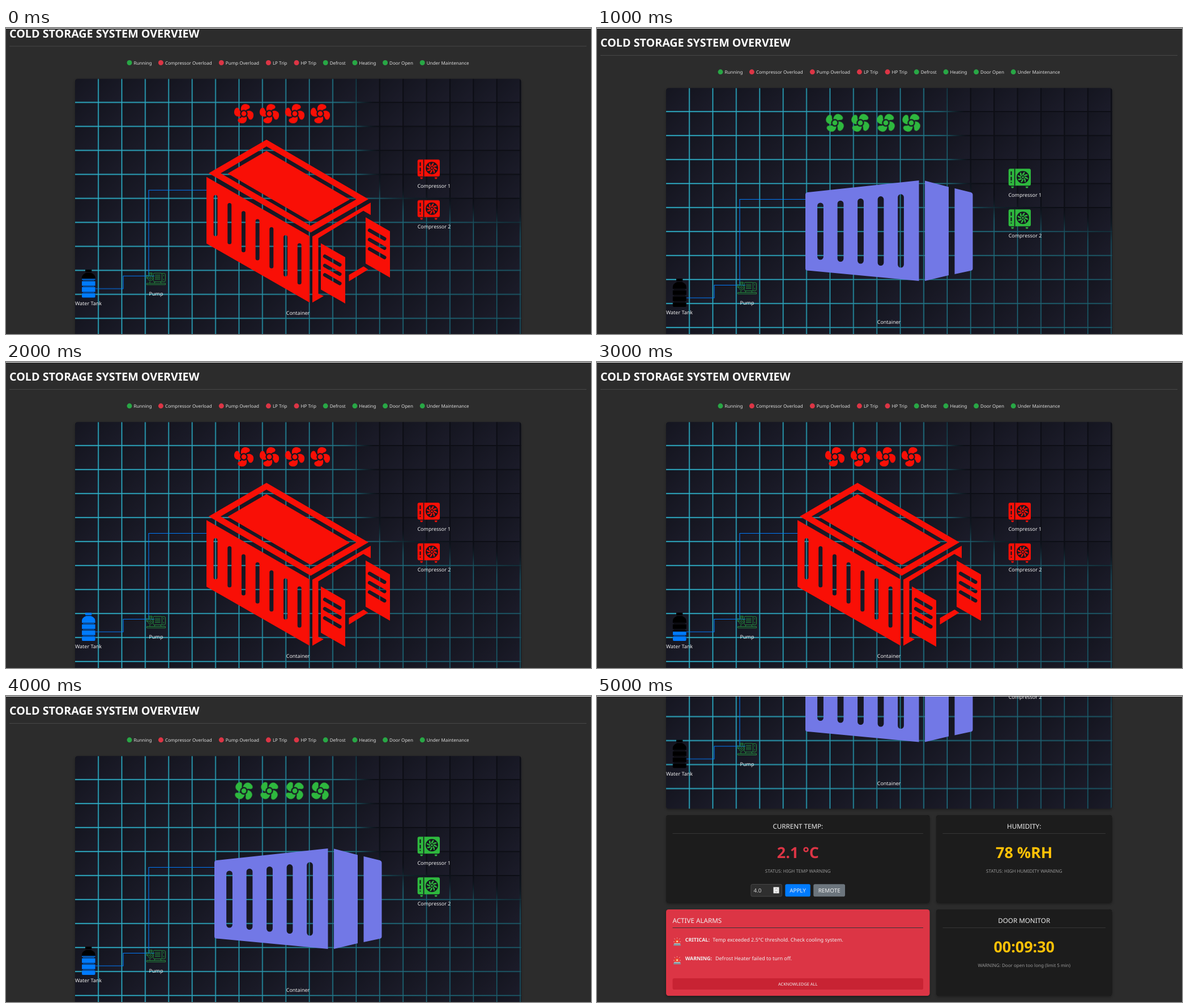
An HTML page for the animation above (6000 ms loop, 1033 px wide and 542 px high).

```html
<!DOCTYPE html>
<html lang="en">
<head>
<meta charset="utf-8">
<title>Cold Storage System Overview</title>
<style>
html, body { margin: 0; width: 100%; height: 100%; overflow: hidden; background: #2c2c2c; }
svg { display: block; width: 1033px; height: 542px; }
text { font: 8.96px "Noto Sans", "Open Sans", sans-serif; fill: #f0f0f0; text-rendering: geometricPrecision; }
.mid text, text.mid { text-anchor: middle; }
text.title { font-size: 19.71px; font-weight: 700; fill: #fff; }
.legend text { font-size: 8.06px; fill: #ddd; }
text.head { font-size: 11.65px; }
text.value { font-size: 26.9px; font-weight: 700; }
text.note { font-size: 8.06px; fill: #999; }
text.btn { font-size: 9.86px; }
text.ack { font-size: 7.4px; }
.bold { font-weight: 700; }
.green { fill: #28a745; }
.red { fill: #dc3545; }
.amber { fill: #ffc107; }
.card { fill: #1a1a1a; }

.page, .state, .spin, .open, .shut, .water { animation: 6s step-end infinite; }
.page { animation-name: scroll; }
.state { animation-name: state; }
.spin { animation-name: spin; }
.open { animation-name: open; }
.shut { animation-name: shut; }
.water { animation-name: level; }
@keyframes scroll {
  0% { transform: translateY(-16.3px); }
  16.666% { transform: translateY(0); }
  83.333% { transform: translateY(-366.5px); }
}
@keyframes state {
  0%, 33.333% { color: #f90f06; }
  16.666%, 66.666% { color: #2eb83e; }
}
@keyframes spin {
  0%, 33.333% { transform: rotate(0deg); }
  16.666% { transform: rotate(20deg); }
  66.666% { transform: rotate(30deg); }
}
@keyframes open {
  0%, 33.333% { visibility: visible; }
  16.666%, 66.666% { visibility: hidden; }
}
@keyframes shut {
  0%, 33.333% { visibility: hidden; }
  16.666%, 66.666% { visibility: visible; }
}
@keyframes level {
  0%, 66.666% { clip-path: inset(33% 0 0 0); }
  16.666%, 83.333% { clip-path: inset(100% 0 0 0); }
  33.333% { clip-path: inset(0 0 0 0); }
  50% { clip-path: inset(67% 0 0 0); }
}
</style>
</head>
<body>
<svg viewBox="0 0 1033 542">
  <defs>
    <linearGradient id="shade" x2="1" y2="1">
      <stop stop-color="#14151f"/><stop offset="1" stop-color="#1c1c2a"/>
    </linearGradient>
    <pattern id="tiles" x="121.7" y="105.5" width="41.39" height="42.5" patternUnits="userSpaceOnUse">
      <rect width="42" height="43" fill="url(#shade)"/>
    </pattern>
    <linearGradient id="fade">
      <stop stop-color="#fff"/><stop offset=".35" stop-color="#ddd"/>
      <stop offset=".6" stop-color="#999"/><stop offset="1" stop-color="#707070"/>
    </linearGradient>
    <filter id="soft"><feGaussianBlur stdDeviation="14"/></filter>
    <filter id="drop" x="-5%" y="-10%" width="110%" height="125%">
      <feDropShadow dx="0" dy="2" stdDeviation="2" flood-opacity=".35"/>
    </filter>
    <mask id="lit" maskUnits="userSpaceOnUse" x="122" y="106" width="788" height="460">
      <rect x="122" y="106" width="788" height="460" fill="url(#fade)"/>
      <path d="M612 60L640 295L700 325L920 366L970 60Z" filter="url(#soft)"/>
    </mask>
    <clipPath id="panel"><rect x="122" y="106.5" width="787.5" height="459.5" rx="4.5"/></clipPath>

    <g id="fan" fill="currentColor">
      <circle r="4.4"/>
      <path id="blade" d="M-4.6 -5C-6 -9-5 -16 1 -17C6 -17.6 11 -15.2 10.6 -11.4C10.2 -8 5.5 -8 3.4 -5.7C.5 -7.2-2 -7-4.6 -5Z"/>
      <use href="#blade" transform="rotate(90)"/>
      <use href="#blade" transform="rotate(180)"/>
      <use href="#blade" transform="rotate(270)"/>
    </g>

    <g id="unit">
      <path fill="currentColor" d="M3 0H36.5Q39.3 0 39.3 3V27Q39.3 30 36.5 30H3Q0 30 0 27V3Q0 0 3 0ZM4.5 31.5H9.5L8.5 34.3H5.5ZM30 31.5H35L34 34.3H31Z"/>
      <path stroke="#15151f" stroke-width="1.6" d="M10.9 0V30"/>
      <path stroke="#15151f" stroke-width="2.2" stroke-linecap="round" d="M4.8 5.5V10.5M4.8 15V20M4.8 24.2V24.3"/>
      <circle cx="25.3" cy="15" r="11" fill="#15151f"/>
      <g id="rotor" transform="translate(25.3 15)" fill="none" stroke="currentColor" stroke-width="2.5">
        <circle r="1.8" fill="currentColor" stroke="none"/>
      </g>
    </g>

    <path id="bottle" d="M140 444H151.300V448.500H140ZM141.500 449.800H150Q157.800 453 157.800 459V462H133.800V459Q133.800 453 141.500 449.800ZM135.500 462.900H156V463.900H135.500ZM133.800 464.700H157.800V472.800H133.800ZM135.500 473.600H156V474.600H135.500ZM133.800 475.400H157.800V483.700H133.800ZM135.500 484.500H156V485.500H135.500ZM133.800 486.300H157.800V492Q157.800 494 155.500 494H136Q133.800 494 133.800 492Z"/>

    <g id="siren">
      <path d="M-4.8 .5L-6.500 0M-3.600 -4L-5 -5.500M0 -5.500V-7M3.600 -4L5 -5.500M4.800 .5L6.500 0" stroke="#f6b9a0" stroke-width="1"/>
      <path d="M-4 3V0A4 4 0 0 1 4 0V3Z" fill="#f0452f"/>
      <circle cy="-.2" r="1.5" fill="#ffe0b0"/>
      <path d="M-5.500 3H5.500L6.500 7.200H-6.500Z" fill="#8596a0"/>
      <path d="M-5.500 3H5.500V4.300H-5.500Z" fill="#b5c2c9"/>
    </g>
  </defs>

  <rect width="1033" height="542" fill="#2c2c2c"/>
  <g class="page">
    <text class="title" x="6" y="33.400">COLD STORAGE SYSTEM OVERVIEW</text>
    <path d="M6 48.500H1025" stroke="#484848"/>
    <g class="legend" id="legend"></g>

    <rect x="122" y="106.500" width="787.500" height="459.500" rx="4.500" fill="#15151f" filter="url(#drop)"/>
    <g clip-path="url(#panel)" fill="none">
      <rect x="121" y="105" width="790" height="462" fill="url(#tiles)"/>
      <path class="grid" stroke="#0d0e15" stroke-width="2.200"/>
      <g mask="url(#lit)">
        <path class="grid" stroke="#1c7f98" stroke-opacity=".35" stroke-width="3.200"/>
        <path class="grid" stroke="#36bdd6" stroke-width="1.300"/>
      </g>
    </g>

    <path d="M369.500 303.500H252V455.500M262 455.500H207V478H157" fill="none" stroke="#007bff" stroke-width="1.100"/>

    <g class="state">
      <g transform="translate(420 168)"><use href="#fan" class="spin"/></g>
      <g transform="translate(465 168)"><use href="#fan" class="spin"/></g>
      <g transform="translate(510 168)"><use href="#fan" class="spin"/></g>
      <g transform="translate(555 168)"><use href="#fan" class="spin"/></g>
      <use href="#unit" x="726.700" y="249.300"/>
      <use href="#unit" x="726.700" y="321.300"/>
    </g>

    <g class="open" fill="#f90f06" fill-rule="evenodd">
      <path d="M460 214L640 319.500L538 378.500L358 273.500ZM460 226L379 273.500L538 366.500L619 319.500ZM460 234L391.500 274L538 359.500L607 320Z"/>
      <path id="wall"/>
      <path d="M541 385.500L644 325.500V347.500L631 340L551.500 388.500V487L561 491L541 502.500Z"/>
      <path class="door" data-x="556" data-y="397.500"/>
      <path class="door" data-x="635" data-y="351.500"/>
      <path d="M605.500 453.500L631.500 438.500L639.500 444L605.500 465Z"/>
    </g>

    <g class="shut" fill="#7278e6">
      <path id="side" fill-rule="evenodd"/>
      <path d="M579 270.500L621 281.500V438L579 448ZM631.500 284L660 291Q663.500 292 663.500 295.500V426Q663.500 429 660.500 429.800L631.500 436Z"/>
    </g>

    <use href="#bottle"/>
    <use href="#bottle" class="water" fill="#007bff"/>

    <g fill="none" stroke="#28a745" stroke-width=".8">
      <path d="M248.500 471H281.500V468.500H248.500ZM254 468.500V465M262 468.500L263 465.500M274 468.500L273 465.500"/>
      <rect x="260" y="450.500" width="15.500" height="15" rx="2"/>
      <path d="M263 454H272.500M263 456.500H272.500M263 459H272.500M263 461.500H272.500"/>
      <path d="M275.500 451H279.500Q281.500 451 281.500 453V463Q281.500 465.500 279.500 465.500H275.500M278.500 453.500V456M278.500 460.500V463"/>
      <path d="M248.500 453.500V460M248.500 455H251.500M248.500 459H251.500M252 450H258V452H252ZM253 452V455M257 452V455"/>
      <circle cx="255" cy="459.500" r="4.500"/>
      <circle cx="255" cy="459.500" r="1.800"/>
    </g>

    <g class="mid">
      <text x="755.800" y="299.200">Compressor 1</text>
      <text x="756" y="371.200">Compressor 2</text>
      <text x="265" y="490">Pump</text>
      <text x="145.500" y="507.200">Water Tank</text>
      <text x="515.500" y="524">Container</text>
    </g>

    <g transform="translate(0 366.500)">
      <g filter="url(#drop)">
        <rect class="card" x="122" y="211" width="465.500" height="155.500" rx="4.500"/>
        <rect class="card" x="599" y="211" width="310.500" height="155.500" rx="4.500"/>
        <rect class="red" x="122" y="378" width="465.500" height="153" rx="4.500"/>
        <rect class="card" x="599" y="378" width="310.500" height="153" rx="4.500"/>
      </g>
      <path d="M133.500 243.500H576M610.500 243.500H898M133.500 410.500H576M610.500 410.500H898" stroke="#363636"/>

      <g class="mid">
        <text class="head" x="354.800" y="235.200">CURRENT TEMP:</text>
        <text class="value red" x="354.800" y="287" style="fill:#dc3545">2.1 °C</text>
        <text class="note" x="354.800" y="313.300">STATUS: HIGH TEMP WARNING</text>
        <text class="head" x="754.200" y="235.200">HUMIDITY:</text>
        <text class="value" x="754.200" y="287" style="fill:#ffc107">78 %RH</text>
        <text class="note" x="754.200" y="313.300">STATUS: HIGH HUMIDITY WARNING</text>
        <text class="head" x="754.200" y="402.200">DOOR MONITOR</text>
        <text class="value" x="754.200" y="454" style="fill:#ffc107">00:09:30</text>
        <text class="note" x="754.200" y="480.200">WARNING: Door open too long (limit 5 min)</text>
      </g>

      <rect x="271.900" y="333.500" width="54.600" height="21.500" rx="2.500" fill="#2f2f2f" stroke="#505050" stroke-width=".8"/>
      <text class="btn" x="276.500" y="347.700" style="fill:#ccc">4.0</text>
      <rect x="311.500" y="338.500" width="10" height="11" fill="#efefef"/>
      <path d="M314.500 342.700L316.500 340.700L318.500 342.700M314.500 345.500L316.500 347.500L318.500 345.500" fill="none" stroke="#777" stroke-width=".8"/>
      <rect x="332.300" y="333.200" width="44.500" height="22" rx="2.800" fill="#007bff"/>
      <text class="btn mid" x="354.500" y="347.700">APPLY</text>
      <rect x="382.200" y="333.200" width="55.800" height="22" rx="2.800" fill="#6c757d"/>
      <text class="btn mid" x="410.200" y="347.700">REMOTE</text>

      <text class="head" x="133.500" y="402.200">ACTIVE ALARMS</text>
      <use href="#siren" x="141.500" y="435"/>
      <text class="bold" x="155.700" y="435.200">CRITICAL:</text>
      <text x="204.300" y="435.200">Temp exceeded 2.5°C threshold. Check cooling system.</text>
      <use href="#siren" x="141.500" y="468"/>
      <text class="bold" x="155.700" y="468.200">WARNING:</text>
      <text x="209" y="468.200">Defrost Heater failed to turn off.</text>
      <rect x="133.500" y="500" width="442.500" height="20" rx="2.800" fill="#c82333"/>
      <text class="ack mid" x="354.700" y="512.700">ACKNOWLEDGE ALL</text>
    </g>
  </g>
  <rect width="1033" height="1" fill="#f4f4f4"/>
</svg>
<script>
const $ = s => document.querySelector(s);
const all = s => document.querySelectorAll(s);
const range = n => [...Array(n).keys()];
const SLOPE = 0.577;

// vertical slot with round ends
const slot = (x, top, bottom, r) =>
  `M${x - r} ${top + r}a${r} ${r} 0 0 1 ${2 * r} 0V${bottom - r}a${r} ${r} 0 0 1 ${-2 * r} 0Z`;

const columns = range(19).map(i => `M${163.1 + i * 41.39} 105V567`);
const rows = range(11).map(i => `M121 ${148 + i * 42.5}H911`);
all('.grid').forEach(p => p.setAttribute('d', columns.concat(rows).join('')));

const wallSlots = range(7).map(i => {
  const x = 370 + i * 24.7, top = 312 + (x - 370) * SLOPE;
  return slot(x, top, top + 73, 3.5);
});
$('#wall').setAttribute('d', 'M354 280L536 385V502.5L354 398Z' + wallSlots.join(''));

const sideSlots = range(5).map(i => slot(394.5 + i * 35.5, 309.5 - i * 3.8, 410.5 + i * 3.5, 5.4));
$('#side').setAttribute('d',
  'M372 291L568.500 270V448L371 429.500Q368 429 368 426V295Q368 291.500 372 291Z' + sideSlots.join(''));

// sheared panel with three slanted slots
all('.door').forEach(p => {
  const x = +p.dataset.x, y = +p.dataset.y;
  const slots = range(3).map(i =>
    `M${x + 8} ${y + 20 + i * 16.5}l27 15.600a3.200 3.200 0 0 1 -2.600 5.800l-27 -15.600a3.200 3.200 0 0 1 2.600 -5.800Z`);
  p.setAttribute('d', `M${x} ${y}l43 24.800v82l-43 -24.800Z` + slots.join(''));
});

$('#rotor').innerHTML += range(8).map(i =>
  `<path d="M0 -3.200Q.3 -6.500 3 -8.600" transform="rotate(${i * 45})"/>`).join('');

const lamps = [
  [218, 'Running', 1], [273.4, 'Compressor Overload'], [380.3, 'Pump Overload'],
  [463.4, 'LP Trip'], [513, 'HP Trip'], [564.2, 'Defrost', 1], [616, 'Heating', 1],
  [669.6, 'Door Open', 1], [735.2, 'Under Maintenance', 1]
];
$('#legend').innerHTML = lamps.map(([x, name, ok]) =>
  `<circle class="${ok ? 'green' : 'red'}" cx="${x}" cy="77.800" r="4.480"/><text x="${x + 7.5}" y="80.900">${name}</text>`).join('');
</script>
</body>
</html>
```
